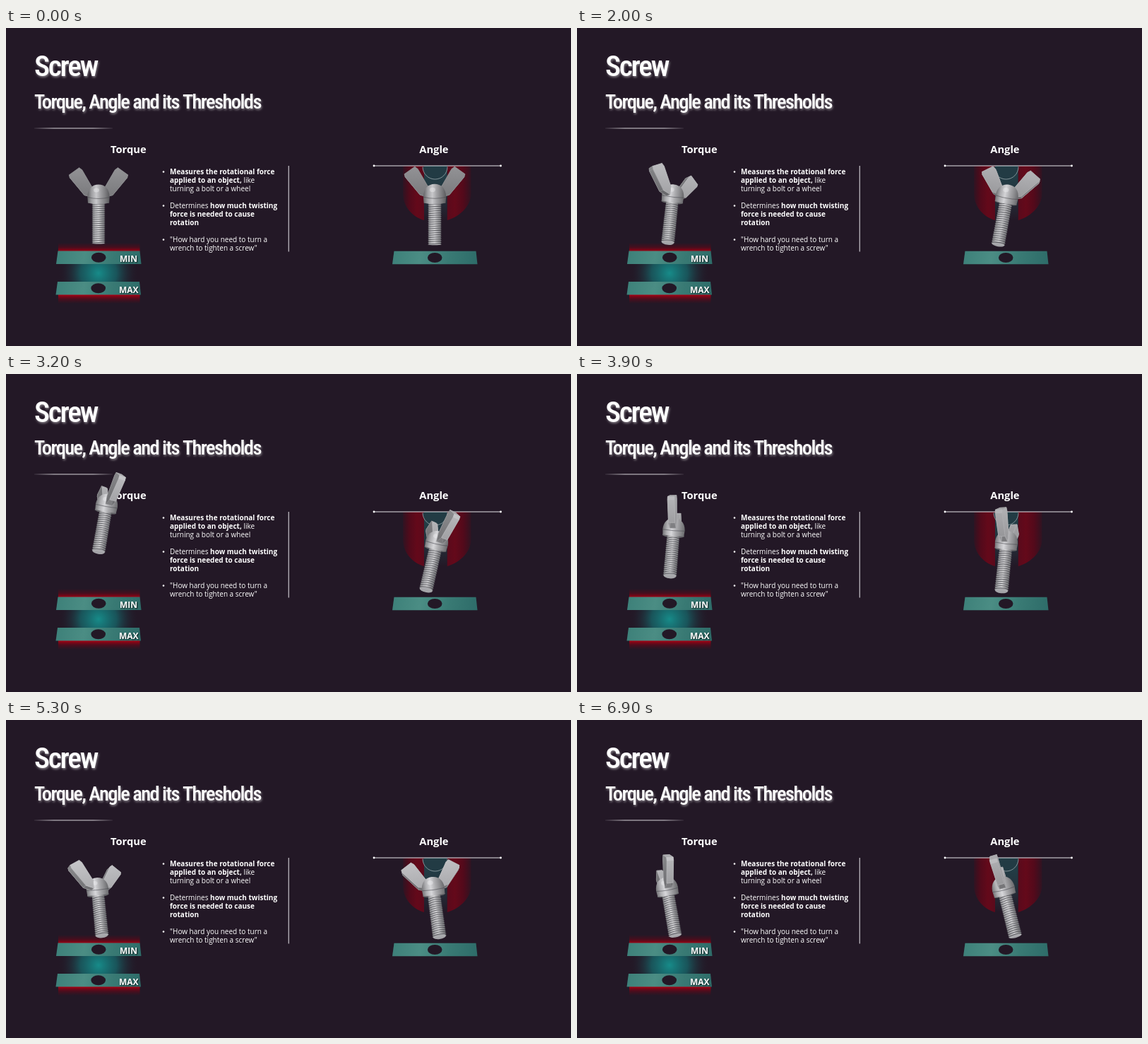
Animation of 800 by 450 pixels, one loop 7 s. Source, as an HTML page with a canvas:

```html
<!DOCTYPE html>
<html lang="en">
<head>
<meta charset="utf-8">
<title>Screw</title>
<style>
  html, body { margin: 0; width: 100%; height: 100%; overflow: hidden; background: #231826; }
  canvas { display: block; width: 800px; height: 450px; }
</style>
</head>
<body>
<canvas id="stage" width="800" height="450"></canvas>
<script>
const ctx = document.getElementById('stage').getContext('2d');
const BG = '#231826', LOOP = 7000, STEP = 100, RAD = Math.PI / 180, VIEW = 300;
const SANS = '"Open Sans", "Noto Sans", sans-serif';
const NARROW = '"Roboto Condensed", "Liberation Sans Narrow", Roboto, sans-serif';

// Poses at key times; yaw runs on through many turns.
const TIMES = [0, 1400, 2500, 3200, 4700, 5900, 6900];
const LEFT = {
  size: 1,
  x: [131, 131.5, 137.5, 141, 131, 129.5, 129],
  yaw: [0, 725, 1315, 1690, 2526, 3180, 3675],
  lean: [0, 4, 8, 10, -1, -10, -10],
  pitch: [0, 18, 18, 18, 23, 17, 14]
};
const RIGHT = {
  size: 1.03,
  x: [607, 606, 608, 608, 606, 606, 606],
  yaw: [0, 826, 1310, 1685, 2553, 3195, 3695],
  lean: [0, 7.5, 13, 13, -2, -13, -14],
  pitch: [0, 8, 16, 16, 18, 16, 11]
};
const WING = [[8, 20], [23, 46], [27, 49], [41, 39], [40, 35], [20, 11], [8, 8]];

const clamp = v => Math.max(0, Math.min(1, v));
const smooth = v => { v = clamp(v); return v * v * (3 - 2 * v); };
const grey = v => `rgb(${v | 0},${v | 0},${(v + 3) | 0})`;

function at(values, t) {
  let i = 0;
  while (i < TIMES.length - 2 && t > TIMES[i + 1]) i++;
  return values[i] + (values[i + 1] - values[i]) * (t - TIMES[i]) / (TIMES[i + 1] - TIMES[i]);
}

function gradient(x0, y0, x1, y1, ...stops) {
  const g = ctx.createLinearGradient(x0, y0, x1, y1);
  stops.forEach((c, i) => g.addColorStop(i / (stops.length - 1), c));
  return g;
}

function shape(points, fill, stroke) {
  ctx.beginPath();
  points.forEach(([x, y]) => ctx.lineTo(x, y));
  ctx.closePath();
  ctx.fillStyle = fill;
  ctx.fill();
  if (stroke) { ctx.strokeStyle = stroke; ctx.stroke(); }
}

function rect(x, y, w, h, fill) {
  ctx.fillStyle = fill;
  ctx.fillRect(x, y, w, h);
}

function ellipse(x, y, rx, ry, fill) {
  ctx.beginPath();
  ctx.ellipse(x, y, rx, ry, 0, 0, 7);
  ctx.fillStyle = fill;
  ctx.fill();
}

function text(str, x, y, font) {
  ctx.font = font;
  ctx.fillStyle = '#fff';
  ctx.fillText(str, x, y);
  return x + ctx.measureText(str).width;
}

function shadow(color, dx, dy, blur, draw) {
  ctx.save();
  Object.assign(ctx, { shadowColor: color, shadowOffsetX: dx, shadowOffsetY: dy, shadowBlur: blur });
  draw();
  ctx.restore();
}

// Tightly spaced headline, set smaller where no condensed face is available.
function headline(str, x, y, size, room) {
  const setFont = px => {
    ctx.letterSpacing = `${-.055 * px}px`;
    return ctx.font = `500 condensed ${px}px ${NARROW}`;
  };
  ctx.save();
  setFont(size);
  const font = setFont(size * Math.min(1, room / ctx.measureText(str).width));
  shadow('rgba(255,255,255,.4)', 1, 2, 3, () => text(str, x, y, font));
  ctx.restore();
}

// Each line is a list of runs; a leading * makes a run bold.
function bullet(y, ...lines) {
  ellipse(223, y - 3.5, 1.3, 1.3, '#fff');
  lines.forEach((runs, i) => {
    let x = 232;
    for (const run of runs) {
      const bold = run[0] === '*';
      x = text(bold ? run.slice(1) : run, x, y + i * 12, `${bold ? 700 : 400} 10px ${SANS}`);
    }
  });
}

function plate(x, y) {
  shape([[x + 2.5, y], [x + 118.5, y], [x + 120.5, y + 18.5], [x, y + 18.5]],
    gradient(x, y, x + 120, y + 18, '#3d8079', '#4b8d84', '#397a74', '#2e6c69'));
  ellipse(x + 60.2, y + 9.3, 10.3, 7, BG);
}

function label(str, x, y) {
  shadow('rgba(0,0,0,.8)', 1, 1, 2, () => text(str, x, y, `700 12px ${SANS}`));
}

function torquePanel() {
  rect(74, 304, 115.5, 12, gradient(0, 304, 0, 316, 'rgba(120,0,18,0)', 'rgba(120,0,18,.4)', 'rgba(170,0,18,.95)'));
  rect(74, 377, 115.5, 13, gradient(0, 377, 0, 390, 'rgba(180,0,18,1)', 'rgba(130,0,18,.45)', 'rgba(110,0,18,0)'));
  ctx.save();
  ctx.beginPath();
  ctx.rect(73, 334, 117, 26);
  ctx.clip();
  const glow = ctx.createRadialGradient(131, 347, 0, 131, 347, 57);
  glow.addColorStop(0, '#178b89');
  glow.addColorStop(.45, 'rgba(22,105,108,.75)');
  glow.addColorStop(1, 'rgba(35,24,38,0)');
  rect(73, 334, 117, 26, glow);
  ctx.restore();
  plate(71, 315.5);
  plate(70.5, 359);
  label('MIN', 161, 330.5);
  label('MAX', 160, 374.8);
}

function anglePanel() {
  const red = (outer, inner, sign) => {
    ctx.beginPath();
    ctx.moveTo(outer, 195);
    ctx.lineTo(outer, 234);
    ctx.bezierCurveTo(outer, 254, inner - sign * 15, 268, inner, 272);
    ctx.lineTo(inner, 195);
    ctx.fillStyle = gradient(outer, 0, inner, 0, 'rgba(90,5,22,.2)', '#530a1b', '#64091a', '#5a0a1c');
    ctx.fill();
  };
  red(562, 592, 1);
  red(658.5, 624.5, -1);
  rect(592, 195, 32.5, 77, gradient(0, 195, 0, 272, '#21434b', '#24343e', BG));
  ctx.beginPath();
  ctx.arc(607.5, 196.5, 17.5, 0, Math.PI);
  ctx.fillStyle = '#223b44';
  ctx.fill();
  ctx.strokeStyle = '#a9b6ba';
  ctx.lineWidth = .7;
  ctx.stroke();
  rect(521, 194.5, 180, 1, '#e6e3e7');
  ellipse(521, 195, 1.4, 1.4, '#fff');
  ellipse(700.5, 195, 1.4, 1.4, '#fff');
  plate(547, 315.7);
}

function wing(side, yaw, pitch, lit) {
  const c = Math.cos(yaw), s = Math.sin(yaw), cp = Math.cos(pitch), sp = Math.sin(pitch);
  const place = ([u, v], w) => {
    const x = side * u * c - w * s, z = side * u * s + w * c;
    return [x, v * cp + z * sp, z * cp - v * sp];
  };
  const front = WING.map(p => place(p, 4.5)), back = WING.map(p => place(p, -4.5));
  const faces = [front, back];
  WING.forEach((p, i) => {
    const j = (i + 1) % WING.length;
    faces.push([front[i], front[j], back[j], back[i]]);
  });
  const depth = f => f.reduce((sum, p) => sum + p[2], 0) / f.length;
  faces.sort((a, b) => depth(a) - depth(b));
  ctx.lineWidth = .6;
  for (const f of faces) {
    const [a, b, d] = f;
    const p = b.map((v, i) => v - a[i]), q = d.map((v, i) => v - b[i]);
    const n = [p[1] * q[2] - p[2] * q[1], p[2] * q[0] - p[0] * q[2], p[0] * q[1] - p[1] * q[0]];
    const len = Math.hypot(...n) * (n[2] < 0 ? -1 : 1) || 1;
    const light = Math.max(0, (n[0] * .35 + n[1] * .25 + n[2] * .9) / len);
    const tone = 78 + 44 * lit + 66 * light;
    const flat = f.map(([x, y, z]) => [x * (1 + z / VIEW), -y * (1 + z / VIEW)]);
    shape(flat, gradient(0, -50, 0, -8, grey(tone + 10), grey(tone - 16)), grey(tone + 14));
  }
}

function bolt(yaw, pitch) {
  const near = 1 + 57 * Math.sin(pitch) / VIEW;
  const long = 57 * Math.cos(pitch) * near, bend = 9 * Math.sin(pitch);
  ellipse(0, 0, 15.5, 15.5 * Math.sin(pitch) * .5 + .6, '#626266');
  shape([[-8.5, -2], [8.5, -2], [8.5 * near, long], [-8.5 * near, long]],
    gradient(-9, 0, 9, 0, '#77777a', '#b8b8bb', '#d0d0d2', '#9a9a9d', '#66666a'));
  ellipse(0, long, 8.5 * near, bend + 1, '#a4a4a8');
  const turn = (yaw / (2 * Math.PI)) % 1;
  ctx.lineWidth = 1;
  for (let y = 2 + turn * 3; y < long; y += 3) {
    const half = 9.3 * (1 + (near - 1) * y / long);
    ctx.beginPath();
    ctx.moveTo(-half, y + .7);
    ctx.quadraticCurveTo(0, y - bend * 1.2, half, y - .5);
    ctx.strokeStyle = 'rgba(62,62,68,.68)';
    ctx.stroke();
    rect(-half, y + 1, half * 2, .8, 'rgba(205,205,208,.35)');
  }
}

function head(pitch, lit) {
  const h = Math.cos(pitch), dip = 2 - 4 * Math.sin(pitch);
  const tone = d => grey(d + 15 * lit);
  ctx.beginPath();
  ctx.moveTo(-15, 0);
  ctx.lineTo(-15.7, -9 * h);
  ctx.bezierCurveTo(-15, -20 * h, -9, -26 * h, 0, -26 * h);
  ctx.bezierCurveTo(9, -26 * h, 15, -20 * h, 15.7, -9 * h);
  ctx.lineTo(15, 0);
  ctx.quadraticCurveTo(0, dip * 2, -15, 0);
  ctx.fillStyle = gradient(-16, 0, 16, 0, tone(96), tone(160), tone(200), tone(158), tone(125), tone(88));
  ctx.fill();
  ctx.beginPath();
  ctx.moveTo(-15.5, -8 * h);
  ctx.quadraticCurveTo(0, -8 * h + dip * 2, 15.5, -8 * h);
  ctx.lineWidth = 1;
  ctx.strokeStyle = 'rgba(70,70,76,.55)';
  ctx.stroke();
  ellipse(-3, -18 * h, 4, 3, 'rgba(240,240,242,.4)');
}

function screw(pose, t, lift) {
  const yaw = at(pose.yaw, t) * RAD, pitch = at(pose.pitch, t) * RAD, lit = clamp(t / 2500);
  const near = side => side * Math.sin(yaw) > .25;
  ctx.save();
  ctx.translate(at(pose.x, t), 247.5 - lift);
  ctx.rotate(at(pose.lean, t) * RAD);
  ctx.scale(pose.size, pose.size);
  for (const side of [-1, 1]) if (!near(side)) wing(side, yaw, pitch, lit);
  bolt(yaw, pitch);
  head(pitch, lit);
  for (const side of [-1, 1]) if (near(side)) wing(side, yaw, pitch, lit);
  ctx.restore();
}

function draw(t) {
  rect(0, 0, 800, 450, BG);
  headline('Screw', 40, 68, 43, 89);
  headline('Torque, Angle and its Thresholds', 40, 113.5, 29, 321);
  rect(40, 141.3, 111, 1.2, gradient(40, 0, 151, 0, 'rgba(200,195,203,.1)', '#b9b5bb', '#b9b5bb', '#b9b5bb', 'rgba(200,195,203,.1)'));
  text('Torque', 148, 176.5, `700 14.7px ${SANS}`);
  text('Angle', 585.3, 176.5, `700 14.7px ${SANS}`);
  bullet(207, ['*Measures the rotational force'], ['*applied to an object,', ' like'], ['turning a bolt or a wheel']);
  bullet(255, ['Determines ', '*how much twisting'], ['*force is needed to cause'], ['*rotation']);
  bullet(303, ['"How hard you need to turn a'], ['wrench to tighten a screw"']);
  rect(399.7, 195, 1.1, 121.5, '#d8d4da');
  torquePanel();
  anglePanel();
  const lift = 57 * smooth((t - 1900) / 1050) * (1 - smooth((t - 2950) / 1550));
  screw(LEFT, t, lift);
  screw(RIGHT, t, 0);
}

const start = performance.now();
function tick() {
  const t = (performance.now() - start) % LOOP;
  draw(Math.floor(t / STEP) * STEP);
  requestAnimationFrame(tick);
}
tick();
</script>
</body>
</html>
```
